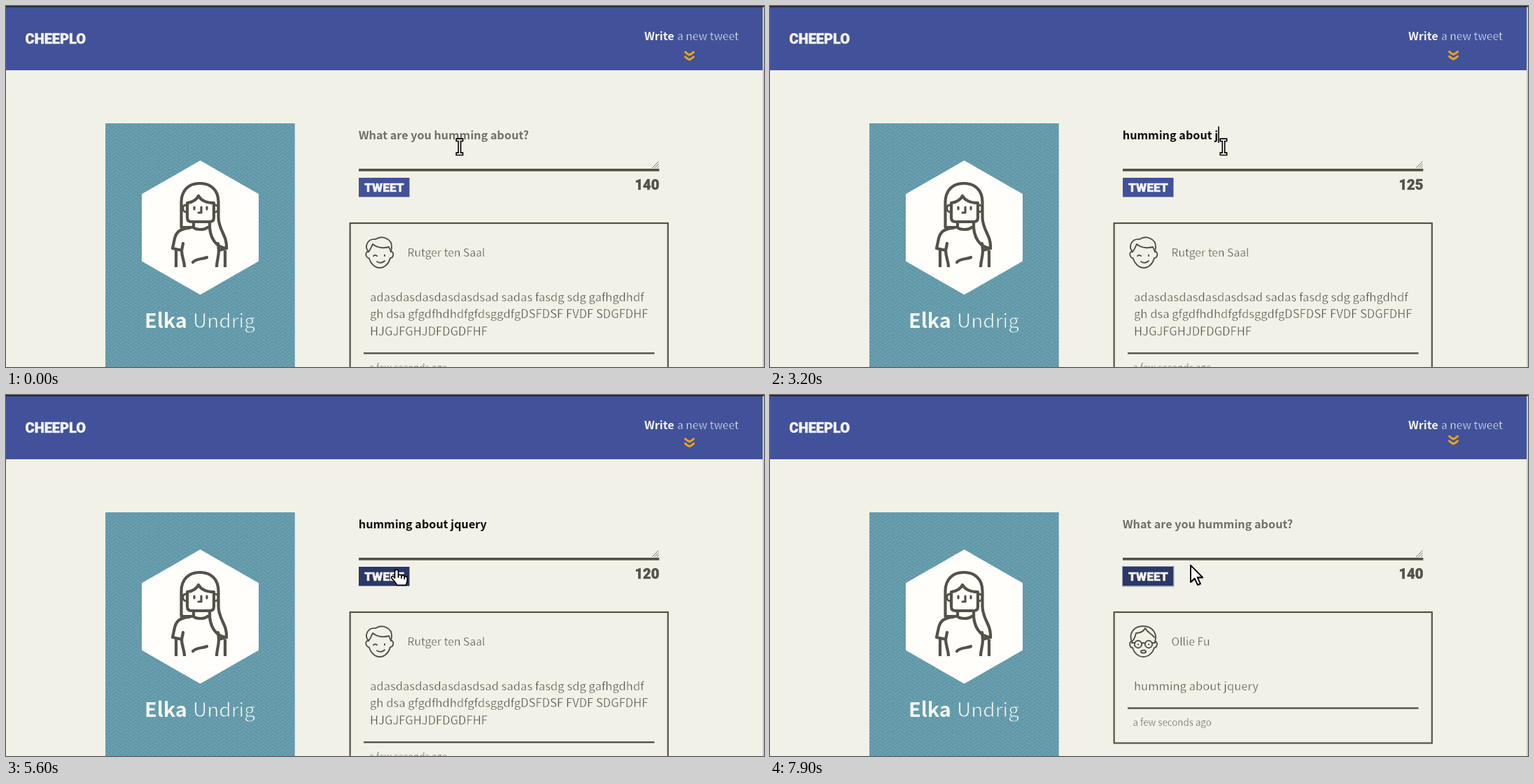
Recreate the animation shown at these times as an HTML page. Size 1083 by 517 pixels, loop 8000 ms.

```html
<!DOCTYPE html>
<html lang="en">
<head>
<meta charset="utf-8">
<title>Cheeplo</title>
<style>
  html, body { margin: 0; width: 100%; height: 100%; overflow: hidden; background: #f2f1e7; }
  svg { display: block; width: 100%; height: 100%; }
  text { font-family: "Noto Sans CJK JP", "Noto Sans CJK SC", "Noto Sans CJK", sans-serif; white-space: pre; }
  .bold { font-weight: 700; }
  /* a thin background-coloured rim slims regular glyphs to a light weight */
  .light { fill: #545149; stroke: #f2f1e7; stroke-width: .4; }
  .block { font-family: Roboto, sans-serif; font-weight: 900; stroke-width: .5; }
  .pale { fill: #f4f3ee; stroke: #f4f3ee; }
  .dark { fill: #545149; stroke: #545149; }
  .ink { fill: none; stroke: #545149; stroke-linecap: round; stroke-linejoin: round; }
  .cursor path { stroke-linejoin: round; }
</style>
</head>
<body>
<svg viewBox="0 0 1083 517" preserveAspectRatio="none">
  <defs>
    <pattern id="weave" width="14" height="10" patternUnits="userSpaceOnUse">
      <rect width="14" height="10" fill="#699faf"/>
      <path d="M-1 4 L3.5 0 L10.5 6 L15 2 M-1 9 L3.5 5 L7 8 M7 3 L10.5 0 M7 8 L10.5 11 L15 7"
        fill="none" stroke="#5c94a4" stroke-width="1.2"/>
    </pattern>
  </defs>
  <rect width="1083" height="517" fill="#f2f1e7"/>

  <!-- header -->
  <rect width="1081" height="92" fill="#41529a"/>
  <rect width="1083" height="1.7" fill="#25262b"/>
  <rect x="1081" y="1.7" width="2" height="516" fill="#c9c9c9"/>
  <text class="block pale" x="27.5" y="53.7" font-size="20">CHEEPLO</text>
  <text class="bold" x="912" y="48.5" font-size="16.2" fill="#f4f3ee">Write</text>
  <text x="959" y="48.5" font-size="15.6" fill="#f0f0f2" stroke="#41529a" stroke-width=".4">a new tweet</text>
  <g id="chevron" fill="none" stroke="#eaa31d" stroke-width="3" stroke-linecap="round" stroke-linejoin="round">
    <path id="vee" d="M970.5 -5.3 Q973.5 -2.4 976.5 -1.2 Q979.5 -2.4 982.5 -5.3"/>
    <use href="#vee" y="6.8"/>
  </g>

  <!-- profile -->
  <rect x="142" y="168" width="270.7" height="349" fill="url(#weave)"/>
  <path d="M277.5 221.3 L361 269.3 V365.5 L277.5 413.5 L194 365.5 V269.3 Z" fill="#fffefb"/>
  <g class="ink" stroke-width="4.2">
    <path d="M268 317 H250.5 V281 C250.5 263 262 254 277 254 S303.5 263 303.5 281 V303 C304 322 316 328 315 347"/>
    <path d="M291 311 C290 331 300 346 315 347"/>
    <path d="M259 283 V303 Q259 309 265 309 H291 Q297 309 297 303 V283"/>
    <path d="M259 282 C266 281 272 278 275 272 C279 279 287 282 297 282"/>
    <path d="M258 285 C251 284 251 295 258 295 M298 285 C305 284 305 295 298 295" stroke-width="3"/>
    <path d="M269 288 V291 M287 288 V291 M279 288 V296 H275" stroke-width="3.2"/>
    <path d="M268 310 V317 C271 321 284 321 288 317"/>
    <path d="M262 318 C247 319 243 325 241 333 L238 347 L251 350 L253 340 M303 340 L304 350 L315 347"/>
    <path d="M243 350 V374 M251 350 C251 360 255 365 255 374 M304 350 C304 360 301 365 301 374 M313 350 V374" stroke-linecap="butt"/>
    <path d="M267 367 C272 361 280 363 287 360"/>
  </g>
  <text class="bold" x="198" y="461" font-size="28.8" fill="#f7f7f2">Elka</text>
  <text x="267" y="461" font-size="28" fill="#f7f7f2" stroke="#649cab" stroke-width=".8">Undrig</text>

  <!-- compose box -->
  <text id="field" class="bold" x="503.8" y="191" font-size="16.22"></text>
  <rect id="caret" y="172.5" width="1.6" height="23.5" fill="#000"/>
  <path d="M923 232 L932.5 222.5 M926.5 232 L932.5 226 M930 232 L932.5 229.5" stroke="#77756f" stroke-width="1"/>
  <rect x="504" y="233" width="429.3" height="3.7" fill="#545149"/>
  <rect id="button" x="504" y="246" width="72.5" height="27.5"/>
  <rect id="focus" x="503.5" y="245.5" width="73.5" height="28.5" fill="none" stroke="#949cb4"/>
  <text class="block pale" x="512" y="265.8" font-size="17.4">TWEET</text>
  <text id="count" class="block dark" x="933.3" y="263" font-size="20" text-anchor="end"></text>

  <!-- first post -->
  <g id="post">
    <rect id="frame" x="491.6" y="311" width="454.2" fill="none" stroke="#545149" stroke-width="2.2"/>
    <g class="ink" stroke-width="1.9">
      <g id="winker">
        <path d="M518 352 C511 344 517 333 528 334 C537 328 552 333 551 346 L550 352"/>
        <path d="M518 352 C521 349 522 345 524 341 C531 347 541 347 547 345 L550 352"/>
        <path d="M518 352 C512 351 514 361 518.5 361 C521 369 527 375 534 375 S547 369 549 361 C554 361 555 351 550 352"/>
        <path d="M525 358 Q527.5 355.5 530 358 M541 356.5 V358 M530 366 Q536 370 541 365"/>
      </g>
      <g id="reader">
        <path d="M517 354 C512 341 520 331 533 331 S554 341 550 354"/>
        <path d="M517 353 C521 350 522 345 523 341 C529 341 534 338 536 334 C540 341 546 342 549 347"/>
        <path d="M517 353 C512 353 514 362 518 362 C520 369 526 375 533.5 375 S547 369 549 362 C553 362 555 353 550 353"/>
        <circle cx="526" cy="357" r="5.2"/>
        <circle cx="541" cy="357" r="5.2"/>
        <path d="M531 356 Q533.5 354 536 356 M517 355 H521 M546 355 H550 M526 357 V357.5 M541 357 V357.5"/>
        <ellipse cx="533.5" cy="367.5" rx="3.6" ry="2"/>
      </g>
    </g>
    <text id="author" class="light" x="573.5" y="359" font-size="15.7"></text>
    <text id="line0" class="light" x="520" y="423" font-size="16.6"></text>
    <text id="line1" class="light" x="520" y="447.4" font-size="16.6"></text>
    <text id="line2" class="light" x="520" y="471.8" font-size="16.6"></text>
    <g id="foot">
      <rect x="511" y="447.3" width="415.5" height="2.4" fill="#545149"/>
      <text class="light" x="518.5" y="474" font-size="13.3">a few seconds ago</text>
    </g>
  </g>

  <!-- pointers, each with its hot spot at 0,0 -->
  <g id="beam" class="cursor" fill="none" stroke-linecap="square">
    <path d="M-3 -10 H3 M0 -10 V10 M-3 10 H3" stroke="#000" stroke-width="5"/>
    <path d="M-3 -10 H3 M0 -10 V10 M-3 10 H3" stroke="#fff" stroke-width="1.7"/>
  </g>
  <g id="arrow" class="cursor">
    <path d="M2 3 V27 L8 21.5 L12 31 L16 29 L12 20.5 H19.5 Z" fill="#000" opacity=".22"/>
    <path d="M.5 .8 V25 L6.2 19.7 L10.6 29 L14.4 27.2 L10.2 18.2 H17.6 Z" fill="#fff" stroke="#000" stroke-width="1.9"/>
  </g>
  <g id="hand" class="cursor">
    <path d="M-1.5 12 V2.5 C-1.5 -.8 3.5 -.8 3.5 2.5 V8 C5 6.8 8 7.2 8 9 C9.5 7.8 12 8.4 12.2 10 C14.5 9.4 16.3 10.4 16.3 12.4 V16 C16.3 19 14.5 20 14.5 22.3 H1.5 C1 19.5 -3 16 -6 12.5 C-7.5 9.5 -4 8.5 -1.5 12 Z M3.5 8 V12 M8 9 V13 M12.2 10.5 V14"
      fill="#fff" stroke="#000" stroke-width="1.7"/>
  </g>
</svg>
<script>
const $ = id => document.getElementById(id);
const LOOP = 8000, CLICK = 300, SUBMIT = 5800, POSTED = 6400;
const MESSAGE = 'humming about jquery';
const KEY_TIMES = [1700, 1800, 1900, 2000, 2100, 2150, 2250, 2300, 2400, 2550,
                   2700, 2800, 2900, 3000, 3200, 3400, 3600, 3700, 3800, 3900];
const LAST_KEY = KEY_TIMES[KEY_TIMES.length - 1];

const BEFORE = {
  author: 'Rutger ten Saal',
  lines: ['adasdasdasdasdasdsad sadas fasdg sdg gafhgdhdf',
          'gh dsa gfgdfhdhdfgfdsggdfgDSFDSF FVDF SDGFDHF',
          'HJGJFGHJDFDGDFHF']
};
const AFTER = { author: 'Ollie Fu', lines: [MESSAGE] };

// pointer stops: time, x, y
const PATH = [[0, 648, 201.8], [4600, 648, 201.8], [5350, 557, 250], [5900, 557, 250],
              [6250, 593, 249], [6500, 593, 249], [7000, 600.5, 243]];

function pointerAt(t) {
  const i = PATH.findIndex(p => p[0] > t);
  if (i < 0) return PATH[PATH.length - 1].slice(1);
  const [t0, x0, y0] = PATH[i - 1], [t1, x1, y1] = PATH[i];
  const u = (t - t0) / (t1 - t0), e = u * u * (3 - 2 * u);
  return [x0 + (x1 - x0) * e, y0 + (y1 - y0) * e];
}

const show = (id, on) => $(id).setAttribute('visibility', on ? 'visible' : 'hidden');
const put = (id, text) => { if ($(id).textContent !== text) $(id).textContent = text; };

function drawChevron(t) {
  const u = ((t + 645) % 650) / 650;
  $('chevron').setAttribute('transform', `translate(0 ${63.1 + 8.2 * u})`);
}

function drawField(t) {
  const typed = t < POSTED ? KEY_TIMES.filter(k => k <= t).length : 0;
  put('field', typed ? MESSAGE.slice(0, typed) : 'What are you humming about?');
  $('field').setAttribute('fill', typed ? '#0b0b0b' : '#716f69');
  put('count', String(140 - typed));

  const typing = t >= KEY_TIMES[0] && t <= LAST_KEY;
  const since = t - (t > LAST_KEY ? LAST_KEY : CLICK);
  const lit = typing || since % 1000 < 500;
  show('caret', t >= CLICK && t < SUBMIT && lit);
  $('caret').setAttribute('x', 504 + (typed ? $('field').getComputedTextLength() - .2 : 0));
}

function drawPointer(t) {
  const [x, y] = pointerAt(t);
  const over = x < 577 && y > 245;
  const kind = over ? 'hand' : y < 236 ? 'beam' : 'arrow';
  for (const id of ['beam', 'arrow', 'hand']) show(id, id === kind);
  $(kind).setAttribute('transform', `translate(${x} ${y})`);
  $('button').setAttribute('fill', over || t >= SUBMIT ? '#2b3765' : '#41529a');
  show('focus', t >= SUBMIT);
}

function drawPost(t) {
  const posted = t >= POSTED, post = posted ? AFTER : BEFORE;
  const extra = (post.lines.length - 1) * 24.4;
  put('author', post.author);
  for (let i = 0; i < 3; i++) put('line' + i, post.lines[i] || '');
  show('winker', !posted);
  show('reader', posted);
  $('foot').setAttribute('transform', `translate(0 ${extra})`);
  $('frame').setAttribute('height', 187.5 + extra);
}

function draw(t) {
  drawChevron(t);
  drawField(t);
  drawPointer(t);
  drawPost(t);
}

const start = performance.now();
function tick() {
  draw((performance.now() - start) % LOOP);
  requestAnimationFrame(tick);
}
tick();
</script>
</body>
</html>
```
